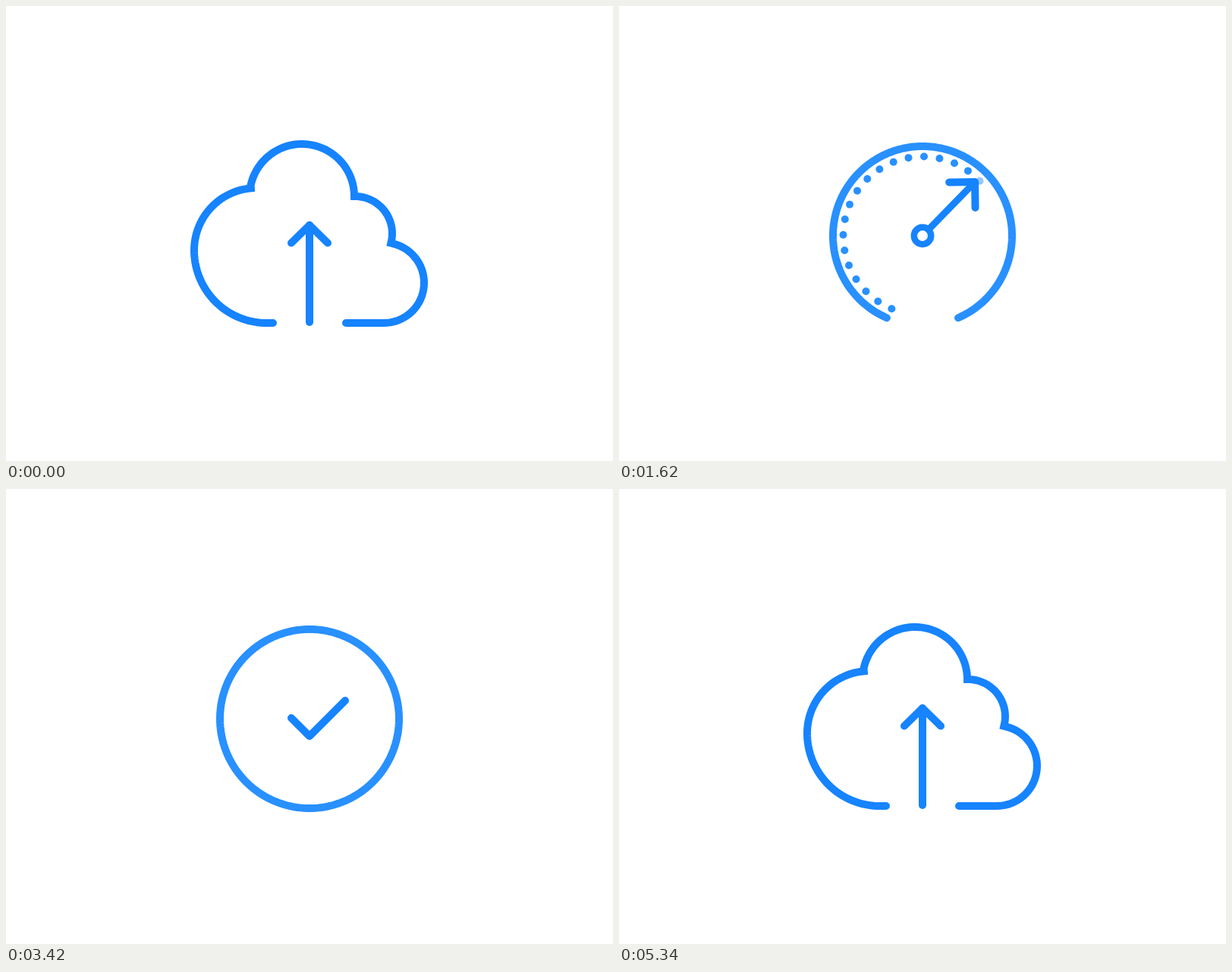
An HTML page that plays this animation: 800x600 px, repeating every 5.58 s.

```html
<!DOCTYPE html>
<html lang="en">
<head>
<meta charset="utf-8">
<title>Upload</title>
<style>
  html, body { margin: 0; width: 100%; height: 100%; overflow: hidden; background: #fff; }
  svg { display: block; width: 100vw; height: 100vh; }
</style>
</head>
<body>
<svg viewBox="0 0 800 600" fill="none" stroke-linecap="round">
  <path id="outline" stroke-width="10" stroke-miterlimit="6"/>
  <g id="dots" fill="#2890ff"></g>
  <g id="glyph" stroke="#1683ff">
    <path id="shaft"/>
    <path id="wings" stroke-width="10" stroke-linejoin="round"/>
    <circle id="hub" cx="400" cy="303" fill="#fff"/>
  </g>
</svg>
<script>
const LOOP = 5580, STEP = 30;
const CX = 400, CY = 303, RING = 118, GAP = 23.5;
const DOTS = 29, DOT_START = 22.9, DOT_STEP = 11.3, DOT_R = 104.5;
const $ = id => document.getElementById(id);
const rad = d => d * Math.PI / 180;
const clamp = x => Math.max(0, Math.min(1, x));
const lerp = (a, b, u) => a + (b - a) * u;

// Ease in and out between two times
function ease(t, from, to) {
  const u = clamp((t - from) / (to - from));
  return u < 0.5 ? 2 * u * u : 1 - 2 * (1 - u) * (1 - u);
}

// Damped swing that begins at a given time
function swing(t, start, decay = 6.7) {
  const s = (t - start) / 1000;
  return s < 0 ? 0 : Math.exp(-decay * s) * Math.sin(13.1 * s);
}

function arc(cx, cy, rx, ry, a, b) {
  const n = Math.ceil(rad(b - a) * rx / 4);
  return Array.from({ length: n + 1 }, (_, i) => {
    const w = rad(lerp(a, b, i / n));
    return [cx + rx * Math.cos(w), cy + ry * Math.sin(w)];
  });
}

const cloud = [
  [352, 418],
  ...arc(343.5, 322, 95.5, 96, 90, 180),
  ...arc(330, 322, 82, 82, 180, 265).slice(1),
  ...arc(390, 251, 69, 69, 189, 360).slice(1),
  ...arc(460, 300, 49, 49, 269, 375).slice(1),
  ...arc(498, 365, 53, 53, 280, 450).slice(1),
  [448, 418]
];

const dots = Array.from({ length: DOTS }, (_, i) => {
  const dot = document.createElementNS("http://www.w3.org/2000/svg", "circle");
  const a = rad(90 + DOT_START + i * DOT_STEP);
  dot.setAttribute("cx", CX + DOT_R * Math.cos(a));
  dot.setAttribute("cy", CY + DOT_R * Math.sin(a));
  dot.setAttribute("r", 5);
  $("dots").append(dot);
  return dot;
});

function drawOutline(t) {
  const round = t < 2100 ? ease(t, 420, 640) : 1 - ease(t, 4010, 4100);
  const gap = GAP * (1 - ease(t, 2160, 2520) + ease(t, 4010, 4100));
  const last = cloud.length - 1;
  const pts = cloud.map(([x, y], i) => {
    const a = rad(lerp(90 + gap, 450 - gap, i / last));
    return lerp(x, CX + RING * Math.cos(a), round).toFixed(2) + " " +
           lerp(y, CY + RING * Math.sin(a), round).toFixed(2);
  });
  const stretch = t < 2100 ? -0.08 * swing(t, 560, 10) : 0.188 * swing(t, 4100);
  const el = $("outline");
  el.setAttribute("d", "M" + pts.join("L"));
  el.setAttribute("transform",
    `translate(400 300) scale(${1 + stretch} ${1 + stretch * 0.2}) translate(-400 -300)`);
  el.setAttribute("stroke",
    `rgb(${lerp(22, 40, round)},${lerp(131, 144, round)},255)`);
}

// Needle angle, clockwise from straight down
function needle(t) {
  return 268 * (t < 1420 ? ease(t, 985, 1420) : 1 - ease(t, 1420, 2120));
}

function pose(t) {
  if (t < 2170) {
    const u = ease(t, 420, 760), w = swing(t, 760, 9);
    return {
      y: lerp(289, 402, u) - 10 * w,
      left: [-24, lerp(23.5, -24, u)],
      right: [24, lerp(23.5, -24, u)],
      top: lerp(289, 314, u),
      end: lerp(417, 402, u) + 5 * w,
      width: lerp(10, 9, u),
      hub: ease(t, 560, 780)
    };
  }
  if (t < 4020) {
    const y = lerp(402, 326, ease(t, 2170, 2420));
    const arm = lerp(24, 47, ease(t, 2350, 2620)) + 7 * swing(t, 2620);
    return {
      y, left: [-24, -24], right: [arm, -arm],
      top: lerp(314, y, ease(t, 2170, 2350)), end: y, width: 9,
      hub: 1 - ease(t, 2170, 2300)
    };
  }
  const w = 5 * swing(t, 4300);
  return {
    y: lerp(326, 289, ease(t, 4020, 4250)),
    left: [lerp(-24, -22, ease(t, 4020, 4140)) - 2 * ease(t, 4140, 4300),
           lerp(-24, 23.5, ease(t, 4130, 4320)) + w],
    right: [lerp(47, 24, ease(t, 4020, 4160)),
            lerp(-47, 23.5, ease(t, 4020, 4290)) + w],
    top: lerp(417, 289, ease(t, 4000, 4170)),
    end: 417,
    width: 10,
    hub: 0
  };
}

function drawGlyph(t) {
  const p = pose(t), angle = needle(t);
  const tip = ([dx, dy]) => `${CX + dx} ${p.y + dy}`;
  $("wings").setAttribute("d", `M${tip(p.left)}L${CX} ${p.y}L${tip(p.right)}`);
  $("shaft").setAttribute("d", p.end - p.top > 0.1 ? `M${CX} ${p.end}V${p.top}` : "");
  $("shaft").setAttribute("stroke-width", p.width);
  $("hub").setAttribute("r", 11.2 * p.hub);
  $("hub").setAttribute("stroke-width", 8.5 * p.hub);
  $("hub").setAttribute("visibility", p.hub > 0 ? "visible" : "hidden");
  $("glyph").setAttribute("transform", `rotate(${angle} ${CX} ${CY})`);
  dots.forEach((dot, i) => {
    const ahead = DOT_START + i * DOT_STEP - angle;
    dot.setAttribute("opacity", clamp((7 - ahead) / 10));
  });
}

function draw(now) {
  const t = Math.floor((now % LOOP) / STEP) * STEP;
  drawOutline(t);
  drawGlyph(t);
}

let start;
function tick(now) {
  start ??= now;
  draw(now - start);
  requestAnimationFrame(tick);
}
draw(0);
requestAnimationFrame(tick);
</script>
</body>
</html>
```
